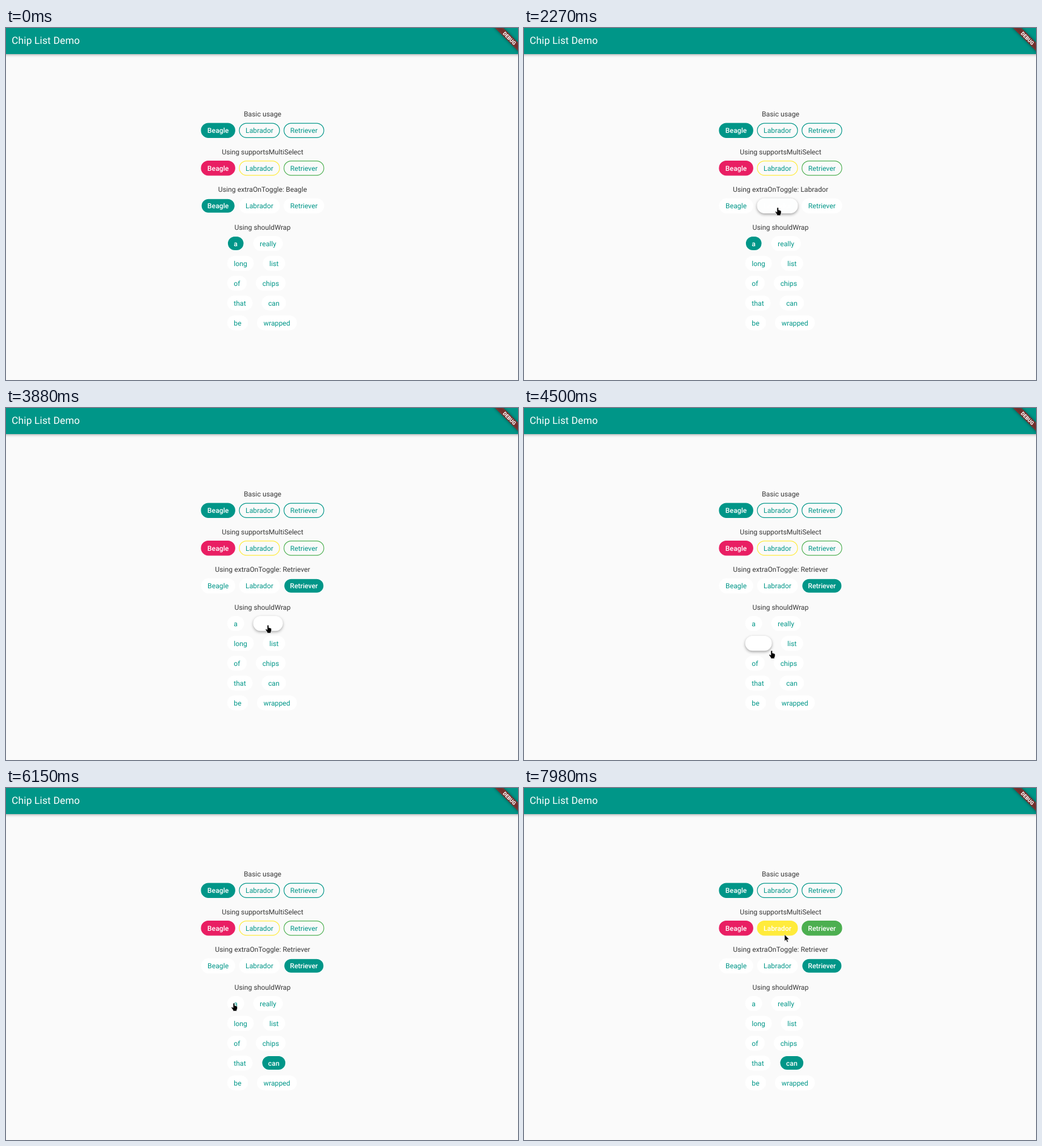
Recreate the animation shown at these times as an HTML page. Size 902 px wide and 621 px high, loop 8000 ms.

```html
<!DOCTYPE html>
<html lang="en">
<head>
<meta charset="utf-8">
<title>Chip List Demo</title>
<style>
  html, body { margin: 0; width: 100%; height: 100%; overflow: hidden; background: #fafafa; }
  svg { display: block; width: 902px; height: 621px; font-family: Roboto, sans-serif; text-rendering: geometricPrecision; }
  .bar { fill: #009688; filter: drop-shadow(0 1.5px 2.5px rgba(0, 0, 0, .36)); }
  .title { font-size: 17.5px; letter-spacing: .12px; fill: #fff; }
  .label, .chip { font-size: 12.25px; text-anchor: middle; }
  .label { fill: #383838; }
  .debug { font-size: 8.9px; font-weight: 900; fill: #fff; text-anchor: middle; }
</style>
</head>
<body>
<svg viewBox="0 0 902 621">
  <rect width="902" height="621" fill="#fafafa"/>
  <rect class="bar" x="-10" y="-10" width="922" height="56"/>
  <text class="title" x="10" y="28">Chip List Demo</text>
  <g transform="translate(887 18.1) rotate(45)">
    <rect x="-45" y="-5.25" width="90" height="10.5" opacity=".5" style="filter: blur(2.6px)"/>
    <rect x="-45" y="-5.25" width="90" height="10.5" fill="#b71c1c" opacity=".627"/>
    <text class="debug" y="3.2">DEBUG</text>
  </g>
  <g id="content"></g>
  <g id="cursor" stroke="#fff" stroke-width=".6" stroke-linejoin="round">
    <path id="arrow" d="M0 -.5V11.2L2.7 8.8L4.6 13L6.4 12.2L4.6 8.1H8.2Z"/>
    <path id="hand" d="M-1.4 1.2Q-1.4 0 0 0Q1.3 0 1.3 1.2V4.4Q2.5 4 2.9 4.9Q4.1 4.6 4.5 5.5Q6 5.3 6 6.8V9Q6 11 4.9 12V14H-1.4V12.4L-4.2 8.4Q-4.9 6.9 -3.5 6.7L-1.4 8.2Z"/>
  </g>
</svg>
<script>
const LOOP = 8000, TEAL = '#009688', WHITE = '#ffffff', PAPER = '#fafafa';
const HEIGHT = 26.4, STROKE = 1.2, PADDING = 23.3, ROW_STEP = 66.5;
const [content, cursor, arrow, hand] =
  ['content', 'cursor', 'arrow', 'hand'].map(id => document.getElementById(id));
const dogs = ['Beagle', 'Labrador', 'Retriever'];

function add(tag, attrs, text = '') {
  const el = document.createElementNS('http://www.w3.org/2000/svg', tag);
  for (const key in attrs) el.setAttribute(key, attrs[key]);
  el.textContent = text;
  content.append(el);
  return el;
}

const addLabel = (row, text) =>
  add('text', { class: 'label', x: 452, y: 156 + ROW_STEP * row }, text);

function addChips(words, left, y, gap, colors, border) {
  return words.map((word, i) => {
    const rect = add('rect', {
      y: y - HEIGHT / 2 + STROKE / 2, height: HEIGHT - STROKE,
      rx: (HEIGHT - STROKE) / 2, 'stroke-width': STROKE
    });
    const text = add('text', { class: 'chip', y: y + 4.5 }, word);
    const width = text.getComputedTextLength() + PADDING;
    const x = left + width / 2;
    rect.setAttribute('x', left + STROKE / 2);
    rect.setAttribute('width', width - STROKE);
    text.setAttribute('x', x);
    left += width + gap;
    return { rect, text, x, y, width, color: colors[i % colors.length], border };
  });
}

const addDogs = (row, colors, border) =>
  addChips(dogs, 343.4, 180.7 + ROW_STEP * row, 6.6, colors, border);

addLabel(0, 'Basic usage');
const basic = addDogs(0, [TEAL]);
addLabel(1, 'Using supportsMultiSelect');
const multi = addDogs(1, ['#e91e63', '#ffeb3b', '#4caf50']);
const extraLabel = addLabel(2, '');
const extra = addDogs(2, [TEAL], WHITE);
addLabel(3, 'Using shouldWrap');
const wrap = ['a really', 'long list', 'of chips', 'that can', 'be wrapped'].flatMap((pair, i) =>
  addChips(pair.split(' '), 389.7, 380.1 + 35 * i, 15.8, [TEAL], WHITE));
const groups = [basic, multi, extra, wrap];

const click = (time, chip) => ({ time, chip, x: chip.x, y: chip.y + 3 });
const point = (time, x, y) => ({ time, x, y });

// The pointer's journey: chips it clicks and points it passes
const stops = [
  point(460, 290, 617), point(920, 430, 285), point(1200, 540, 410), point(1420, 524, 452),
  click(2180, extra[1]), click(2860, extra[2]),
  point(3040, 647, 400), point(3190, 546.5, 456),
  click(3860, wrap[1]), click(4430, wrap[2]), point(4500, 436.3, 428), click(4800, wrap[3]),
  point(5120, 422.5, 461), click(5390, wrap[6]), click(5760, wrap[7]),
  point(6150, 401.5, 379.5), click(6960, multi[1]), click(7600, multi[2]),
  point(7980, 459, 259)
];
const clicks = [...groups.map(group => click(-999, group[0])), ...stops.filter(s => s.chip)];

const ramp = (t, from, to) => Math.min(1, Math.max(0, (t - from) / (to - from)));
const ease = k => k * k * (3 - 2 * k);
const mix = (a, b, k) => a + (b - a) * k;

function blend(color, k) {
  const part = i => Math.round(mix(255, parseInt(color.slice(i, i + 2), 16), k));
  return `rgb(${part(1)},${part(3)},${part(5)})`;
}

// The text turns white at once; the fill arrives a little later
function paint({ rect, text, color, border }, on, age) {
  const lift = on ? ramp(age, -60, 30) * (1 - ramp(age, 150, 330)) : 0;
  rect.setAttribute('fill', on ? blend(color, ramp(age, 90, 250)) : border || PAPER);
  rect.setAttribute('stroke', border || color);
  rect.style.filter = lift ? `drop-shadow(0 2px 2.5px rgba(0,0,0,${0.36 * lift}))` : 'none';
  text.setAttribute('fill', on ? WHITE : TEAL);
  text.setAttribute('font-weight', on ? 500 : 400);
}

function paintGroup(group, t) {
  const done = clicks.filter(c => c.time <= t && group.includes(c.chip));
  const active = group === multi ? done : done.slice(-1);
  for (const chip of group) {
    const hit = active.find(c => c.chip === chip);
    paint(chip, !!hit, hit ? t - hit.time : 0);
  }
  return group.indexOf(done[done.length - 1].chip);
}

function isOver(chip, x, y) {
  const flat = (chip.width - HEIGHT) / 2;
  return Math.hypot(Math.max(0, Math.abs(x - chip.x) - flat), y - chip.y) < HEIGHT / 2 - 2;
}

function movePointer(t) {
  const last = stops.filter(s => s.time <= t).pop();
  cursor.style.display = last ? '' : 'none';
  if (!last) return;
  const next = stops[stops.indexOf(last) + 1] || last;
  const k = next === last ? 0 : ease(ramp(t, last.time + 60, next.time));
  const x = mix(last.x, next.x, k), y = mix(last.y, next.y, k);
  cursor.setAttribute('transform', `translate(${x} ${y})`);
  const pointing = groups.flat().some(chip => isOver(chip, x, y)) ||
    clicks.some(c => t >= c.time && t < c.time + 150);
  hand.style.display = pointing ? '' : 'none';
  arrow.style.display = pointing ? 'none' : '';
}

function draw(t) {
  const [, , dog] = groups.map(group => paintGroup(group, t));
  extraLabel.textContent = 'Using extraOnToggle: ' + dogs[dog];
  movePointer(t);
}

const start = performance.now();
function tick() {
  draw((performance.now() - start) % LOOP);
  requestAnimationFrame(tick);
}
tick();
</script>
</body>
</html>
```
